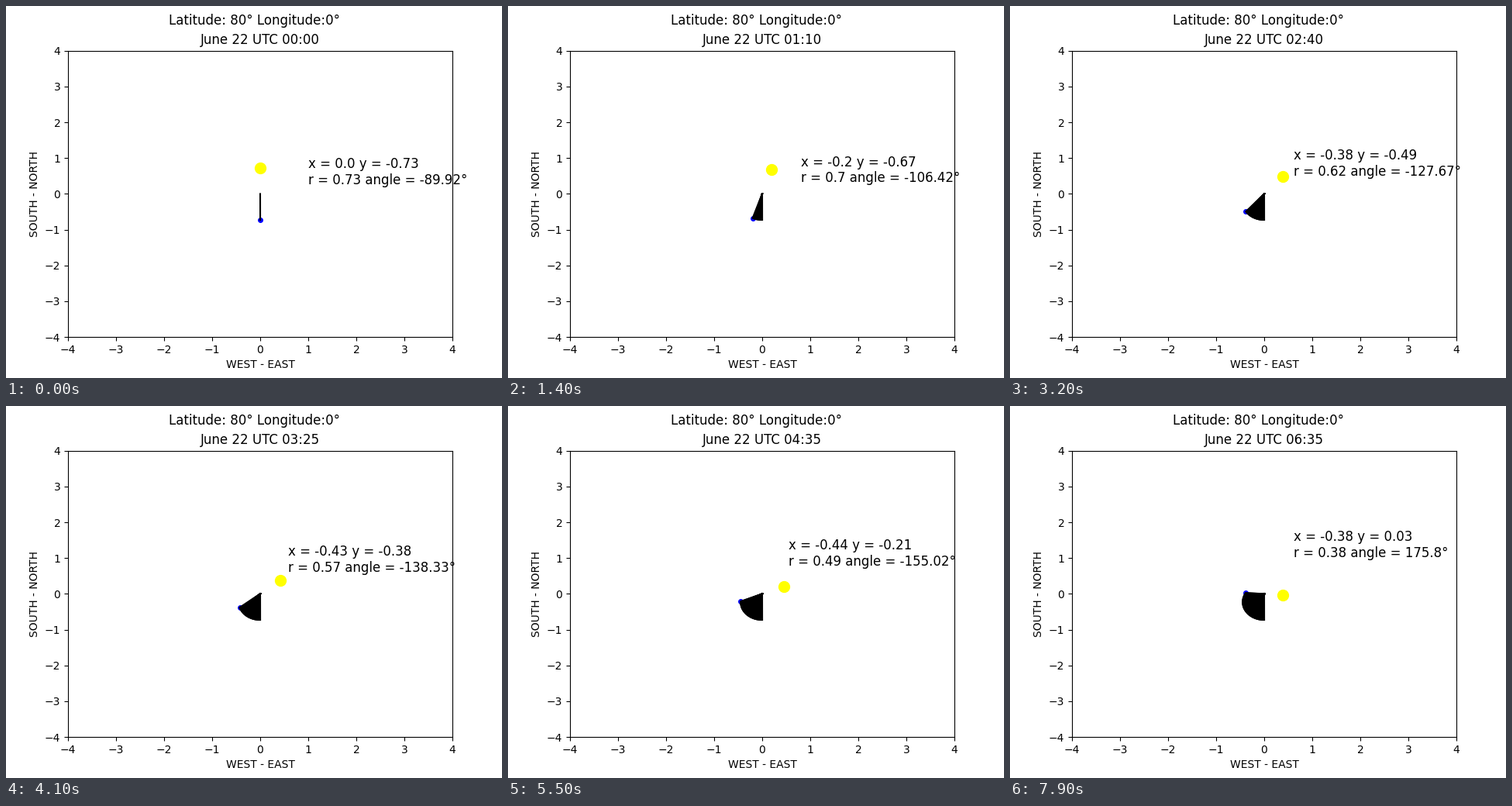
These frames come from a looping animation (640x480 px, 8000 ms). A matplotlib script:

```python
from math import acos, asin, atan2, cos, degrees, hypot, radians, sin, tan

import matplotlib.pyplot as plt
from matplotlib.animation import FuncAnimation

FRAMES = 80
STEP_MIN = 5
LATITUDE = 80
TILT = radians(23.44)
DEG_PER_DAY = 360 / 365.25


def shadow(minutes):
    """Tip of the shadow, `minutes` after 00:00 UTC on the day after solstice."""
    lat = radians(LATITUDE)
    orbit = radians(DEG_PER_DAY * (1 + minutes / 1440))
    dec = asin(sin(TILT) * cos(orbit))
    lag = atan2(sin(orbit), cos(orbit) * cos(TILT)) - orbit
    hour = radians(minutes / 4) - lag  # counted from midnight

    east = cos(dec) * sin(hour)
    north = sin(dec) * cos(lat) + cos(dec) * sin(lat) * cos(hour)
    up = sin(dec) * sin(lat) - cos(dec) * cos(lat) * cos(hour)
    scale = cos(lat) / up
    return -east * scale, -north * scale


tips = [shadow(STEP_MIN * n) for n in range(FRAMES)]

fig, ax = plt.subplots(figsize=(6.4, 4.8), dpi=100)
fig.suptitle(f"Latitude: {LATITUDE}° Longitude:0°")
ax.set(xlim=(-4, 4), ylim=(-4, 4), xlabel="WEST - EAST", ylabel="SOUTH - NORTH")
title = ax.set_title("")

sun, = ax.plot([], [], "o", color="yellow", markersize=10)
dot, = ax.plot([], [], "o", color="blue", markersize=4)
rays = [ax.plot([0, x], [0, y], color="black", lw=1.5)[0] for x, y in tips]
label = ax.text(0, 0, "", fontsize=12)


def update(n):
    x, y = tips[n]
    hours, mins = divmod(STEP_MIN * n, 60)
    title.set_text(f"June 22 UTC {hours:02d}:{mins:02d}")
    sun.set_data([-x], [-y])
    dot.set_data([x], [y])
    for i, ray in enumerate(rays):
        ray.set_visible(i <= n)
    r, angle = hypot(x, y), degrees(atan2(y, x))
    label.set_position((x + 1, y + 1))
    label.set_text(
        f"x = {round(x, 2)} y = {round(y, 2)}\n"
        f"r = {round(r, 2)} angle = {round(angle, 2)}°"
    )
    return [title, sun, dot, label, *rays]


anim = FuncAnimation(fig, update, frames=FRAMES, interval=100,
                     repeat=True, repeat_delay=0, blit=False)
plt.show()
```
